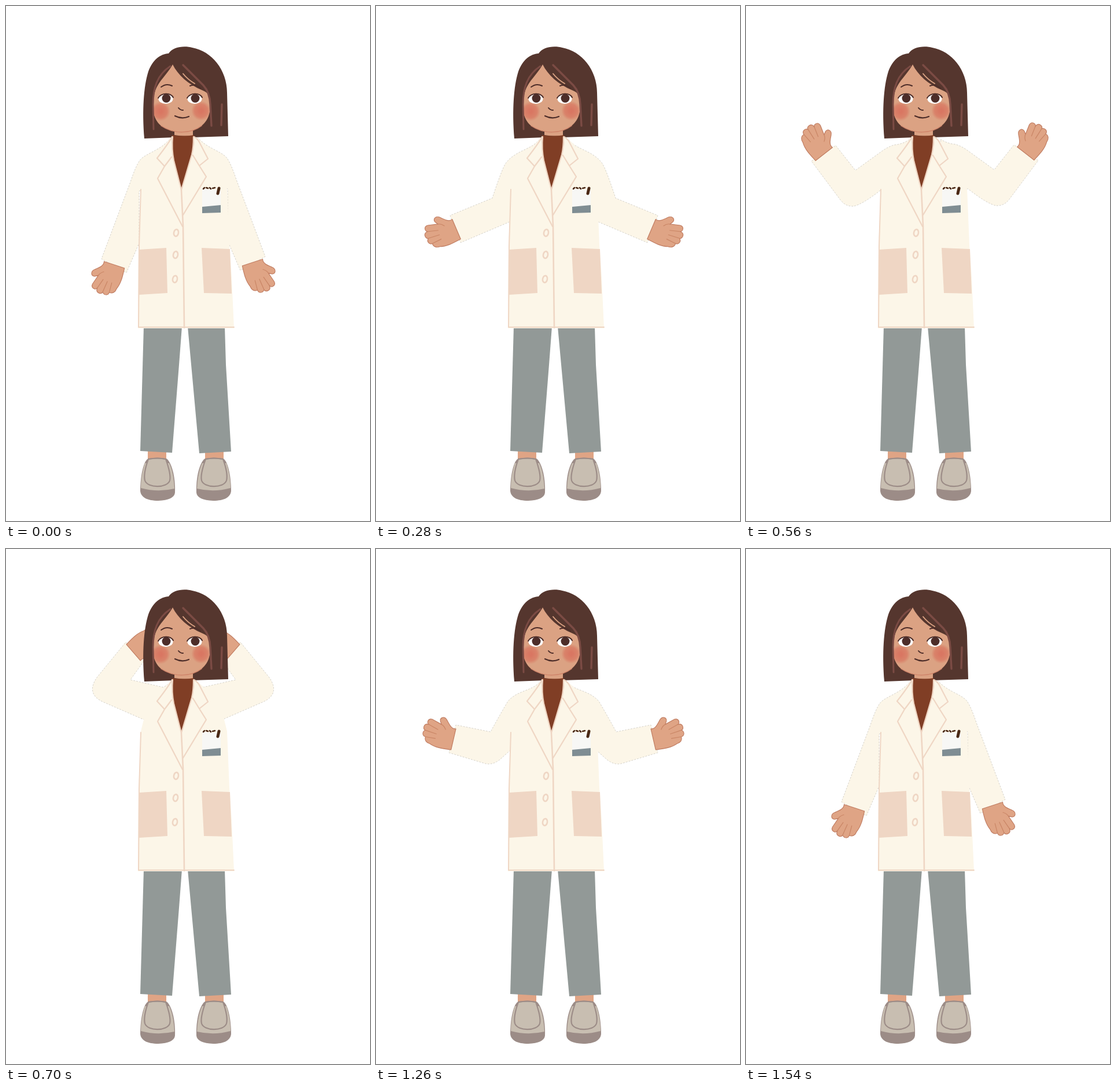
Write an HTML page with a canvas that moves like this. It is 629 px wide and 890 px high and loops after 1680 ms.

```html
<!DOCTYPE html>
<html lang="en">
<head>
<meta charset="utf-8">
<title>Doctor raising her arms</title>
<style>
html, body { margin: 0; width: 100%; height: 100%; overflow: hidden; background: #fff; }
canvas { display: block; width: 629px; height: 890px; }
</style>
</head>
<body>
<canvas id="stage" width="629" height="890"></canvas>
<script>
const ctx = document.getElementById('stage').getContext('2d');
const LOOP = 1680;
const COAT = '#fcf6e8', TAN = '#efd6c4', SKIN = '#dfa485', FACE = '#dba283';
const HAIR = '#55362e', STRAND = '#7b4b44', INK = '#4d2d29';
const SOLE = '#9c8c87', SHOE = '#c8beb1', TROUSERS = '#929997';

// Left sleeve, cuff centre and hand angle; the right arm is mirrored
// about half of "mirror" and raised by "lift".
const poses = {
  down: { sleeve: 'M282 231C266 250 240 255 231 267Q224 277 215 304L165 437L208 461L230 410V320L270 300Z',
    cuff: [186, 449], angle: 108, mirror: 613, lift: 4 },
  low: { sleeve: 'M282 231C268 249 241 249 224 272Q217 283 201 332L128 362L146 409L231 373L270 300Z',
    cuff: [137, 386], angle: 157, mirror: 615, lift: 0 },
  level: { sleeve: 'M282 231C267 246 245 244 228 263Q212 290 198 316L138 304L126 352L186 370Q200 375 214 364L233 347L270 300Z',
    cuff: [132, 328], angle: 193, mirror: 613, lift: 0 },
  raised: { sleeve: 'M282 231Q270 239 256 240Q246 243 236 250L189 284L155 241L113 268L163 335Q172 347 186 346Q201 343 233 318L270 300Z',
    cuff: [134, 254], angle: 232, mirror: 618, lift: 1 },
  behind: { sleeve: 'M284 231L272 239L215 226L238 194L207 161L157 222C144 241 148 255 167 264L236 294L270 300Z',
    cuff: [222, 178], angle: 319, mirror: 612, lift: 0 }
};
const timeline = [
  [280, 'down'], [420, 'low'], [560, 'level'], [700, 'raised'], [1120, 'behind'],
  [1260, 'raised'], [1400, 'level'], [1540, 'low'], [LOOP, 'down']
];

function fill(d, color) {
  ctx.fillStyle = color;
  ctx.fill(new Path2D(d));
}

function line(d, color, width) {
  ctx.strokeStyle = color;
  ctx.lineWidth = width;
  ctx.stroke(new Path2D(d));
}

function oval(x, y, rx, ry, color) {
  ctx.beginPath();
  ctx.ellipse(x, y, rx, ry, 0, 0, Math.PI * 2);
  ctx.fillStyle = color;
  ctx.fill();
}

function mirrored(sum, lift, draw) {
  draw();
  ctx.save();
  ctx.translate(sum, -lift);
  ctx.scale(-1, 1);
  draw();
  ctx.restore();
}

function hand({ cuff, angle }) {
  const shape = 'M-2 18C5 16 10 22 16 29C22 36 30 31 27 25L24 20L41 25C49 26 50 17 45 15L48 15C54 14 54 5 49 4C54 0 52 -7 46 -7C47 -13 42 -17 36 -17C24 -22 10 -20 -2 -19Z';
  ctx.save();
  ctx.translate(...cuff);
  ctx.rotate(angle * Math.PI / 180);
  fill(shape, SKIN);
  line(shape, '#c17d62', 1.2);
  line('M24 20Q19 19 15 13M45 15L28 10M49 4L29 2M46 -7L29 -6', '#c98565', 1.2);
  ctx.restore();
}

function arm(pose) {
  fill(pose.sleeve, COAT);
  ctx.setLineDash([2, 3]);
  line(pose.sleeve, 'rgba(110,105,95,.4)', 0.7);
  ctx.setLineDash([]);
  hand(pose);
}

function shoe() {
  fill('M245 768H277V786H245Z', SKIN);
  fill('M246 782C236 787 232 818 232 838C233 849 244 855 263 855C281 854 291 850 292 841C293 813 286 788 277 782Q262 779 246 782Z', SOLE);
  fill('M240 790C235 805 233 822 233 833Q262 841 291 834C290 815 287 800 282 790Z', SHOE);
  fill('M246 784Q262 781 276 784C280 797 285 813 283 820C279 833 245 833 240 821C238 813 242 797 246 784Z', SHOE);
  line('M246 783C241 797 238 812 240 820C245 834 279 833 283 820C285 812 281 797 276 783Q262 780 246 783', SOLE, 2.2);
}

function legs() {
  mirrored(621, 0, shoe);
  fill('M238 554H304L299 620L287 772L232 769Z', TROUSERS);
  fill('M314 554H378L380 620L389 770L334 773Z', TROUSERS);
}

function coat() {
  fill('M287 225L275 239L252 262L240 287L233 315L229 415L228 557H394L390 470L386 412L382 315L375 287L361 260L341 238L326 225Z', COAT);
  fill('M230 421L277 418L279 496L230 499Z', TAN);
  fill('M338 418L387 420L390 497L342 496Z', TAN);
  line('M233 317L230 415L229 555H394', TAN, 2);
  line('M303 318L306 380L308 556', TAN, 2.6);
  for (const [x, y] of [[294, 392], [293, 430], [292, 472]]) {
    ctx.beginPath();
    ctx.ellipse(x, y, 4, 6, 0.2, 0, Math.PI * 2);
    ctx.stroke();
  }
  fill('M339 316L371 318V346L339 348Z', '#f7f7f5');
  fill('M339 347L371 344V357L339 358Z', '#7f8d93');
  line('M341 316l2 -2M346 314l3 1M352 314l2 2M357 315l4 -1', '#4a2815', 2.5);
  line('M368 315L366 324', '#4a2815', 5);
}

function collar() {
  fill('M287 223Q305 226 325 223Q325 245 321 257L303 319L290 267Q286 245 287 223Z', '#803e25');
  line('M288 226Q286 247 290 267L303 318L321 257Q324 245 324 226', TAN, 2.2);
  line('M287 226Q282 236 261 263L274 277L286 261M274 277L262 298L305 381', TAN, 2.2);
  line('M325 226Q331 229 335 237L349 264L334 276L323 258M334 276L346 295L306 361', TAN, 2.2);
}

function cheek(x, y) {
  const glow = ctx.createRadialGradient(x, y, 3, x, y, 17);
  glow.addColorStop(0, 'rgba(216,108,90,.8)');
  glow.addColorStop(0.6, 'rgba(216,110,90,.6)');
  glow.addColorStop(1, 'rgba(216,114,92,0)');
  oval(x, y, 17, 17, glow);
}

function eye(x, y) {
  oval(x, y + 0.5, 12.5, 8.5, '#fff');
  oval(x + 1, y - 0.5, 7.5, 7.5, INK);
  line(`M${x - 13} ${y - 1}C${x - 8} ${y - 10} ${x + 8} ${y - 11} ${x + 13} ${y - 2}`, INK, 2);
}

function head() {
  fill('M239 229C235 180 238 138 246 113C254 92 267 83 281 82C288 70 309 68 322 72C355 78 382 110 382 150L384 225L322 227H291Z', HAIR);
  fill('M291 205H323V224Q306 226 291 223Z', FACE);
  const face = new Path2D('M288 101C279 118 261 132 257 150C251 171 253 195 268 207C290 222 320 221 338 207C352 196 355 178 352 157Q350 150 340 146C314 135 297 119 288 101Z');
  ctx.fillStyle = FACE;
  ctx.fill(face);
  ctx.save();
  ctx.clip(face);
  cheek(267, 182);
  cheek(337, 181);
  ctx.restore();
  line('M268 207C290 222 320 221 338 207', '#cf846a', 1.5);
  line('M284 104C261 119 254 142 254 170L255 213', STRAND, 3);
  line('M306 102L341 137Q352 149 353 170L355 207M373 170L372 206', STRAND, 3.4);
  line('M306 117Q314 127 326 134', FACE, 2);
  line('M268 140Q277 133 287 138M318 138Q327 134 336 142', INK, 2);
  eye(276, 160);
  eye(326, 160);
  line('M298 176Q301 180 306 180', INK, 2);
  line('M292 190Q304 196 316 191', INK, 2.2);
}

function render(now) {
  const time = now % LOOP;
  const pose = poses[timeline.find(([end]) => time < end)[1]];
  ctx.fillStyle = '#fff';
  ctx.fillRect(0, 0, 629, 890);
  ctx.lineCap = ctx.lineJoin = 'round';
  legs();
  mirrored(pose.mirror, pose.lift, () => arm(pose));
  coat();
  head();
  collar();
}

const start = performance.now();
function tick() {
  render(performance.now() - start);
  requestAnimationFrame(tick);
}
tick();
</script>
</body>
</html>
```
